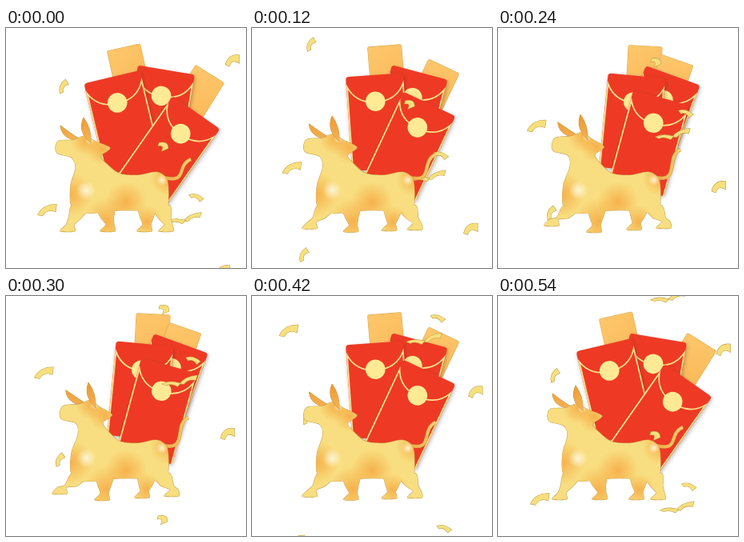
Write an HTML page with a canvas that moves like this. It is 300 by 300 pixels and loops after 570 ms.

```html
<!DOCTYPE html>
<html lang="en">
<head>
<meta charset="utf-8">
<title>Golden ox and red envelopes</title>
<style>
html, body { margin: 0; width: 100%; height: 100%; overflow: hidden; background: #fff; }
canvas { display: block; width: 300px; height: 300px; }
</style>
</head>
<body>
<canvas id="stage"></canvas>
<script>
const STEP = 30, STEPS = 19, RISE = 13.15, LAP = 20;
const GOLD = '#f8de80', ORANGE = '#f3a640', EDGE = '#c29b48', TRIM = '#fbe58c', RED = '#ee3a24';

const canvas = document.getElementById('stage');
const ctx = canvas.getContext('2d');
const dpr = window.devicePixelRatio || 1;
canvas.width = canvas.height = 300 * dpr;

// Corner, pivot, and tilt and swing in degrees
const tags = [
  { x: 126.5, y: 29, px: 172, py: 160, tilt: -12.5, swing: 15.5 },
  { x: 237, y: 46.5, px: 163, py: 184, tilt: 32, swing: -13 }
];
const envelopes = [
  { x: 165, y: 46.5, px: 172, py: 155, tilt: 9.5, swing: 10.5 },
  { x: 97.5, y: 69.5, px: 157, py: 183, tilt: -13.5, swing: 19 },
  { x: 208.5, y: 85, px: 168, py: 194, tilt: 35, swing: -19.8 }
];

const scraps = [
  { x: 71, y: 73, drift: 0.45, len: 9, thick: 6, turn: -56 },
  { x: 283, y: 40, drift: 0.6, len: 10, thick: 9, turn: -18 },
  { x: 51.5, y: 227, drift: -0.4, len: 13, thick: 8, turn: -18 },
  { x: 238, y: 211, drift: -0.4, len: 9, thick: 5, turn: 25 },
  { x: 233, y: 236, drift: -0.5, len: 12, thick: 5, turn: -18 },
  { x: 197, y: 147, drift: 0.1, len: 6, thick: 8, turn: 55 },
  { x: 213, y: 241, drift: -0.6, len: 11, thick: 4, turn: 5 }
];

// Key points of the ox, clockwise from the muzzle
const torso = [
  [62, 149], [66, 141], [84, 140], [98, 135], [112, 142], [130, 150], [118, 160],
  [126, 170], [142, 182], [165, 184], [188, 180], [201, 189], [203, 215], [198, 231],
  [166, 228], [140, 228], [112, 231], [90, 231], [81, 220], [81, 196], [87, 175],
  [82, 162], [65, 157]
];
const legs = [
  { hip: 93, foot: 78, dx: -10, dy: -7 },
  { hip: 123, foot: 128, dx: -7, dy: 1 },
  { hip: 176, foot: 174, dx: -3, dy: -2 },
  { hip: 193, foot: 201, dx: 7, dy: -4 }
];
// Soft spots: x, y, radius
const warm = [[80, 208, 28], [126, 242, 30], [120, 151, 20], [100, 140, 20], [150, 218, 26], [176, 242, 20], [202, 188, 22]];
const shine = [[100, 203, 12], [195, 190, 7], [105, 140, 6]];

const rad = deg => deg * Math.PI / 180;

function paint(fill, edge, path) {
  const shape = path ? [path] : [];
  if (edge) {
    ctx.strokeStyle = edge;
    ctx.lineWidth = 1.1;
    ctx.stroke(...shape);
  }
  ctx.fillStyle = fill;
  ctx.fill(...shape);
}

function fade(x0, y0, x1, y1, from, to) {
  const g = ctx.createLinearGradient(x0, y0, x1, y1);
  g.addColorStop(0, from);
  g.addColorStop(1, to);
  return g;
}

function swung(p, k, draw) {
  ctx.save();
  ctx.translate(p.px, p.py);
  ctx.rotate(rad(p.swing * k));
  ctx.translate(p.x - p.px, p.y - p.py);
  ctx.rotate(rad(p.tilt));
  draw();
  ctx.restore();
}

function drawTag() {
  ctx.beginPath();
  ctx.roundRect(0, 0, 42, 62, 2);
  paint(fade(0, 0, 42, 62, '#fdc76c', '#fbb856'), '#d9a850');
}

function drawEnvelope() {
  const w = 72, h = 118, mid = w / 2;
  ctx.save();
  ctx.shadowColor = 'rgba(60,50,40,.35)';
  ctx.shadowBlur = 5 * dpr;
  ctx.shadowOffsetX = dpr;
  ctx.shadowOffsetY = 2 * dpr;
  ctx.beginPath();
  ctx.roundRect(0, 0, w, h, 4);
  paint(RED);
  ctx.restore();
  // Side trims and flap
  ctx.beginPath();
  ctx.moveTo(1, h);
  ctx.lineTo(1, 13);
  ctx.bezierCurveTo(8, 28, 21, 34, mid, 34);
  ctx.bezierCurveTo(w - 21, 34, w - 8, 28, w - 1, 13);
  ctx.lineTo(w - 1, h);
  ctx.strokeStyle = TRIM;
  ctx.lineWidth = 1.7;
  ctx.stroke();
  ctx.beginPath();
  ctx.arc(mid - 1, 33, 12.3, 0, 7);
  paint('#feea94');
}

// Curved paper strips rise steadily and wrap after a lap
function drawScraps(s) {
  for (const { x, y, drift, len, thick, turn } of scraps) {
    for (const age of [s - LAP, s, s + LAP]) {
      ctx.save();
      ctx.translate(x + drift * age, y - RISE * age);
      ctx.rotate(rad(turn));
      ctx.beginPath();
      ctx.moveTo(-len, thick / 3);
      ctx.quadraticCurveTo(-len / 4, -thick, len, -thick / 3);
      ctx.lineTo(len * 0.7, thick * 0.7);
      ctx.quadraticCurveTo(0, -thick / 4, -len * 0.6, thick * 0.7);
      ctx.closePath();
      paint('#f7df7c', '#b99b48');
      ctx.restore();
    }
  }
}

// Closed smooth curve through the points
function addCurve(path, pts, tension) {
  const n = pts.length, at = i => pts[(i + n) % n];
  path.moveTo(...pts[0]);
  for (let i = 0; i < n; i++) {
    const [a, b, c, d] = [-1, 0, 1, 2].map(j => at(i + j));
    path.bezierCurveTo(
      b[0] + (c[0] - a[0]) / tension, b[1] + (c[1] - a[1]) / tension,
      c[0] - (d[0] - b[0]) / tension, c[1] - (d[1] - b[1]) / tension, ...c);
  }
  path.closePath();
}

function addLeg(path, { hip, foot, dx, dy }, k) {
  const x = foot + dx * k, y = 254 + dy * k;
  addCurve(path, [
    [hip - 11, 222], [hip + 12, 222], [(hip + x) / 2 + 9, 237],
    [x + 7, y - 8], [x + 8, y], [x - 10, y], [x - 3, y - 8], [(hip + x) / 2 - 7, 237]
  ], 9);
}

// The head lifts and the pull dies away along the neck
function lift([x, y], k) {
  const w = k * Math.exp(-((x - 84) ** 2 + (y - 132) ** 2) / 2000);
  return [x + 8 * w, y - 5 * w];
}

function drawHorn(tip, outer, base, inner, k) {
  const [a, b, c, d] = [tip, outer, base, inner].map(p => lift(p, k));
  ctx.beginPath();
  ctx.moveTo(...a);
  ctx.quadraticCurveTo(...b, ...c);
  ctx.quadraticCurveTo(...d, ...a);
  paint(fade(0, 112, 0, 144, '#ee9a34', '#f7b556'), EDGE);
}

function drawTail(k) {
  const x = 231 - 3 * k, y = 164 - 12 * k;
  ctx.beginPath();
  ctx.moveTo(193, 186);
  ctx.bezierCurveTo(230, 196, x - 20, y + 9, x, y);
  for (const [width, color] of [[4.5, EDGE], [3.5, fade(195, 0, x, 0, ORANGE, '#f9cf74')]]) {
    ctx.lineWidth = width;
    ctx.strokeStyle = color;
    ctx.stroke();
  }
}

function glow(spots, rgb, alpha, k) {
  for (const [cx, cy, r] of spots) {
    const [x, y] = lift([cx, cy], k);
    const g = ctx.createRadialGradient(x, y, 0, x, y, r);
    g.addColorStop(0, `rgba(${rgb},${alpha})`);
    g.addColorStop(1, `rgba(${rgb},0)`);
    ctx.fillStyle = g;
    ctx.fillRect(x - r, y - r, 2 * r, 2 * r);
  }
}

function drawOx(k) {
  const body = new Path2D();
  addCurve(body, torso.map(p => lift(p, k)), 7);
  legs.forEach(leg => addLeg(body, leg, k));
  drawTail(k);
  drawHorn([68, 122], [70, 141], [98, 142], [84, 135], k);
  paint(GOLD, EDGE, body);
  ctx.save();
  ctx.clip(body);
  glow(warm, '246,166,62', 0.8, k);
  glow(shine, '255,249,224', 0.9, k);
  ctx.restore();
  drawHorn([97, 112], [89, 130], [106, 143], [107, 126], k);
}

function draw(s) {
  // Cosine sway over one lap, scaled to 0 at the first step and 1 at step ten
  const c = Math.cos(Math.PI / 10);
  const k = (c - Math.cos(2 * Math.PI * (s + 1) / LAP)) / (2 * c);
  ctx.setTransform(dpr, 0, 0, dpr, 0, 0);
  ctx.fillStyle = '#fff';
  ctx.fillRect(0, 0, 300, 300);
  tags.forEach(p => swung(p, k, drawTag));
  envelopes.forEach(p => swung(p, k, drawEnvelope));
  drawScraps(s);
  drawOx(k);
}

const start = performance.now();
function tick() {
  const t = Math.max(0, performance.now() - start);
  draw(Math.floor(t / STEP) % STEPS);
  requestAnimationFrame(tick);
}
tick();
</script>
</body>
</html>
```
